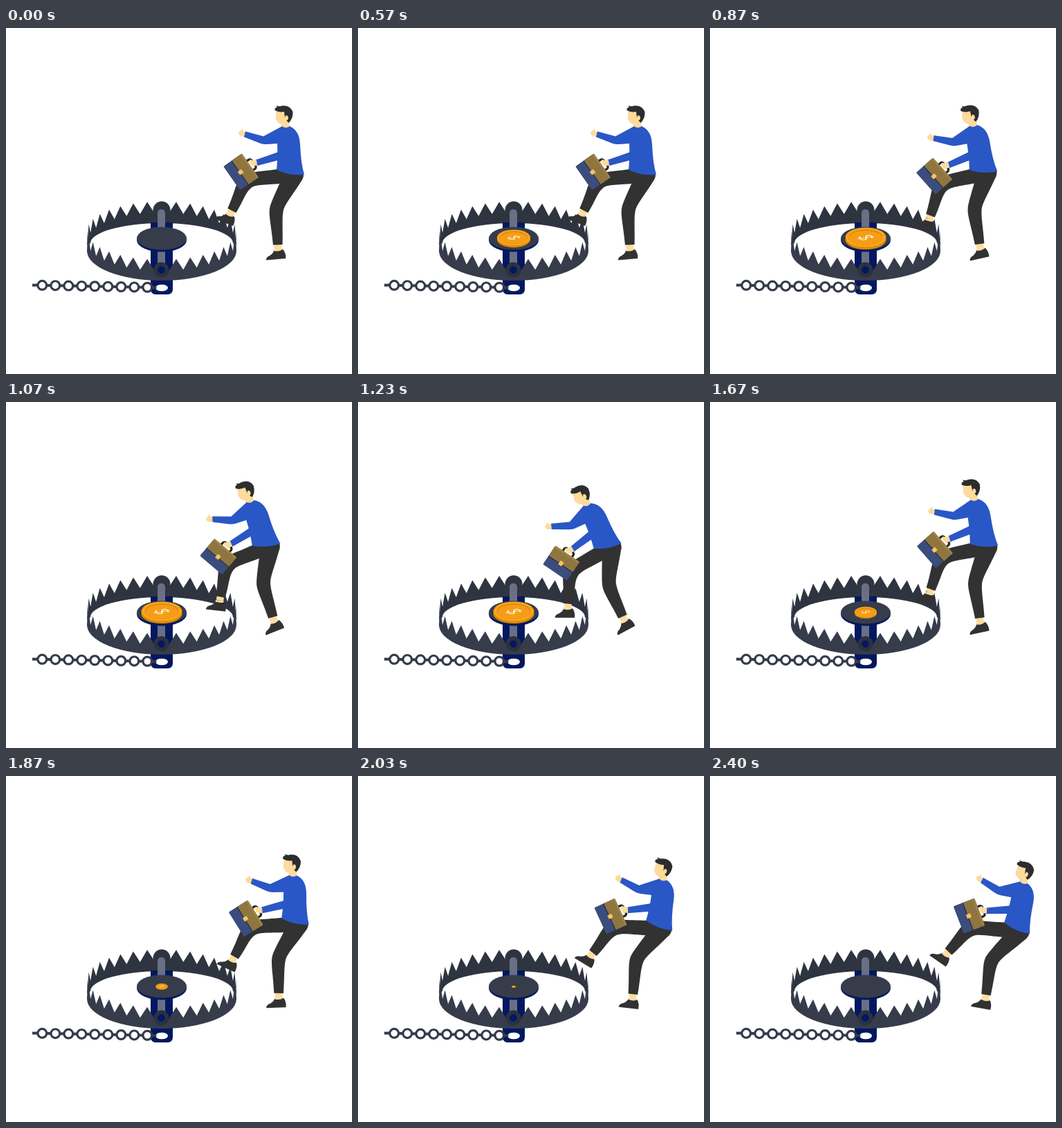
An HTML page with a canvas that plays this animation: 500x500 px, repeating every 2430 ms.

```html
<!DOCTYPE html>
<html lang="en">
<head>
<meta charset="utf-8">
<title>Trap</title>
<style>
html, body { margin: 0; width: 100%; height: 100%; overflow: hidden; background: #fff; }
canvas { display: block; width: 500px; height: 500px; }
</style>
</head>
<body>
<canvas id="stage"></canvas>
<script>
const canvas = document.getElementById('stage');
const ratio = Math.max(1, window.devicePixelRatio || 1);
canvas.width = canvas.height = 500 * ratio;
const ctx = canvas.getContext('2d');

const LOOP = 2430;
const C = {
  steel: '#2f3441', jaw: '#363c4a', navy: '#02185f', rod: '#697086', skin: '#fddb9d', shirt: '#2a57c6',
  pants: '#323232', hair: '#2d2d2d', gold: '#8f7640', blue: '#3b4d7d', clasp: '#f6c55c'
};
const TURN = 37.5 * Math.PI / 180;
const REST = 0.626;

// Joint places at three lean values, from crouching forward to leaning back
const LEANS = [0.068, REST, 1];
const JOINTS = {
  hip: [[360.5, 208.5], [411, 209], [443.5, 220.5]],
  frontKnee: [[308, 246], [348, 222], [376, 221]],
  frontAnkle: [[303, 297], [324, 268.5], [341, 257.5]],
  backKnee: [[363, 265], [391, 262], [407, 267]],
  backAnkle: [[384.5, 315], [393, 319], [398, 321.5]]
};

function joint(name, p) {
  const [a, b, c] = LEANS, k = JOINTS[name];
  const w = [
    (p - b) * (p - c) / ((a - b) * (a - c)),
    (p - a) * (p - c) / ((b - a) * (b - c)),
    (p - a) * (p - b) / ((c - a) * (c - b))
  ];
  return [0, 1].map(i => w[0] * k[0][i] + w[1] * k[1][i] + w[2] * k[2][i]);
}

function fill(d, color) {
  ctx.fillStyle = color;
  ctx.fill(new Path2D(d));
}

function oval(x, y, rx, ry, color) {
  ctx.fillStyle = color;
  ctx.beginPath();
  ctx.ellipse(x, y, rx, ry, 0, 0, 2 * Math.PI);
  ctx.fill();
}

function box(x, y, w, h, r, color) {
  ctx.fillStyle = color;
  ctx.beginPath();
  ctx.roundRect(x, y, w, h, r);
  ctx.fill();
}

function placed(x, y, angle, draw) {
  ctx.save();
  ctx.translate(x, y);
  ctx.rotate(angle);
  draw();
  ctx.restore();
}

// ---- trap ----
const TEETH = 16, STEP = Math.PI / TEETH;

function teeth(cy, ry) {
  const rim = a => [225 - 107.5 * Math.cos(a), cy + ry * Math.sin(a)];
  ctx.moveTo(...rim(0));
  for (let i = 0; i <= TEETH; i++) {
    const [x, y] = rim(i * STEP);
    ctx.lineTo(x, y - 16.5);
    ctx.lineTo(...rim(Math.min(Math.PI, (i + 0.5) * STEP)));
  }
}

function backJaw() {
  ctx.fillStyle = C.steel;
  ctx.beginPath();
  teeth(308, -41);
  ctx.lineTo(333, 314);
  ctx.lineTo(328, 311);
  ctx.ellipse(225, 311, 103, 29, 0, 0, Math.PI, true);
  ctx.lineTo(117, 314);
  ctx.fill();
}

function frontJaw() {
  ctx.fillStyle = C.jaw;
  ctx.beginPath();
  teeth(310.5, 40.5);
  ctx.lineTo(333, 322);
  ctx.ellipse(225, 322, 108, 43, 0, 0, Math.PI);
  ctx.fill();
}

function chain() {
  ctx.strokeStyle = '#353b4b';
  for (let i = 0; i < 9; i++) {
    const x = 52.3 + 19 * i, y = 371.8 + 0.37 * i;
    ctx.lineWidth = 3.2;
    ctx.beginPath();
    ctx.arc(x, y, 6.4, 0, 2 * Math.PI);
    ctx.stroke();
    ctx.lineWidth = 4;
    ctx.beginPath();
    ctx.moveTo(x + 6, y + 0.2);
    ctx.lineTo(x + 13, y + 0.3);
    ctx.stroke();
  }
  ctx.beginPath();
  ctx.moveTo(38, 371.6);
  ctx.lineTo(47, 371.6);
  ctx.stroke();
}

function trap(size) {
  backJaw();
  oval(225, 263, 12.5, 12.5, C.steel);
  box(209, 281, 32, 104, [0, 0, 7, 7], C.navy);
  oval(225, 375.5, 9, 4.8, '#fff');
  chain();
  box(219, 262, 11, 88, 5, C.rod);
  frontJaw();
  box(219, 324, 11, 20, 0, C.rod);
  oval(224.5, 349.5, 11, 11, '#2c3140');
  oval(224.5, 349.5, 5.2, 5.2, C.navy);
  oval(225, 306.5, 36, 17, C.navy);
  oval(225, 304, 36, 16.5, C.jaw);
  if (size > 0) coin(size);
}

function coin(size) {
  ctx.save();
  ctx.translate(225, 304.5);
  ctx.scale(size, size);
  oval(0, 1.5, 29.5, 14, '#e08a0b');
  oval(0, -2, 29.5, 14, '#f8a51b');
  oval(0, -2, 24.5, 11.2, '#d98209');
  oval(0, -1.3, 23.8, 10.4, '#f59d18');
  ctx.translate(0, -1.8);
  ctx.scale(1, 0.52);
  ctx.rotate(1.2);
  ctx.fillStyle = '#fff0cd';
  ctx.font = '27px Lato, sans-serif';
  ctx.textAlign = 'center';
  ctx.textBaseline = 'middle';
  ctx.fillText('$', 0, 1);
  ctx.restore();
}

// ---- man ----
function normal([x0, y0], [x1, y1]) {
  const d = Math.hypot(x1 - x0, y1 - y0);
  return [(y0 - y1) / d, (x1 - x0) / d];
}

const shift = ([x, y], [dx, dy], k) => [x + dx * k, y + dy * k];
const mix = ([x0, y0], [x1, y1], k) => [x0 + (x1 - x0) * k, y0 + (y1 - y0) * k];

// Trouser outline with a softly bent knee
function trouser(hip, knee, cuff, hipR, kneeR, cuffR) {
  const n0 = normal(hip, knee), n1 = normal(knee, cuff);
  const bend = normal([0, 0], [n0[1] + n1[1], -n0[0] - n1[0]]);
  const along = [bend[1], -bend[0]];
  const side = s => [shift(hip, n0, s * hipR), shift(knee, bend, s * kneeR), shift(cuff, n1, s * cuffR)];
  const [a, b, c] = side(1), [d, e, f] = side(-1);
  ctx.fillStyle = C.pants;
  ctx.beginPath();
  ctx.moveTo(...a);
  ctx.bezierCurveTo(...mix(a, b, 0.5), ...shift(b, along, -10), ...b);
  ctx.bezierCurveTo(...shift(b, along, 10), ...mix(b, c, 0.5), ...c);
  ctx.lineTo(...f);
  ctx.bezierCurveTo(...mix(f, e, 0.5), ...shift(e, along, 10), ...e);
  ctx.bezierCurveTo(...shift(e, along, -10), ...mix(e, d, 0.5), ...d);
  ctx.fill();
}

function leg(hip, knee, ankle, [hipR, kneeR], shoeTurn) {
  ctx.strokeStyle = C.skin;
  ctx.lineWidth = 10.5;
  ctx.beginPath();
  ctx.moveTo(...knee);
  ctx.lineTo(...ankle);
  ctx.stroke();
  placed(...ankle, shoeTurn, () => {
    fill('M-6 0H6V3H-6Z', C.skin);
    fill('M-6 2.5Q1 5 7 1.5Q11 7 10 15H-18.5Q-18.5 10.5 -12 8.5Q-8 6.5 -6 2.5Z', C.pants);
  });
  oval(...hip, hipR, hipR, C.pants);
  trouser(hip, knee, mix(knee, ankle, 0.9), hipR, kneeR, 6.8);
}

function briefcase() {
  ctx.strokeStyle = '#242424';
  ctx.lineWidth = 3.2;
  ctx.beginPath();
  ctx.roundRect(-8, -22, 16, 10, 3);
  ctx.stroke();
  box(-21, -16, 42, 32.5, 1.5, C.blue);
  box(-21, -16, 42, 17.5, 1.5, C.gold);
  box(-21, -16, 42, 2.5, 1, '#a38542');
  box(-21, 1.5, 42, 1.2, 0, '#2a3048');
  box(-3, -2.5, 6, 6.5, 1, C.clasp);
}

function upperBody() {
  // far arm with the case
  fill('M394 179L361 190.5L363 199L394 191Z', C.shirt);
  placed(339.7, 207.8, 55 * Math.PI / 180, briefcase);
  fill('M362 191L356 191Q351 189 352 193L354 198Q357 201 363 198Z', C.skin);
  // neck and face
  fill('M397 132H409L410 144Q403 147 398 143Z', C.skin);
  fill('M390.5 120L389.5 131Q392 138 398 139Q406 138 408 130V118Z', C.skin);
  fill('M388.5 119Q388 114.5 392 114.5L390.5 112Q395 114 398 112.5Q410 110.5 414.5 121Q415 131 408.5 137L405.5 134Q409 127 405 126L403 130L402 121Q395 122.5 388.5 119Z', C.hair);
  oval(405.5, 130, 2.4, 3.4, C.skin);
  // near hand, torso and arm
  fill('M347 149.5L343 149.5L342 145.5L340 147.5L336 150.5Q336 155.5 341 156.5L346 157.5Z', C.skin);
  fill('M399 142Q404 146 410 142Q424 148 425 168Q426 195 431 212Q410 214 391 205Q393 185 392 167L377 168Q372 168.5 367 166.5L344 157.5L346 149.5L372 156.5Z', C.shirt);
}

function man(p) {
  const hip = joint('hip', p), turn = TURN * (p - REST);
  const cos = Math.cos(turn), sin = Math.sin(turn);
  const anchor = (x, y) => [hip[0] + x * cos - y * sin, hip[1] + x * sin + y * cos];
  leg(anchor(5, 3), joint('backKnee', p), joint('backAnkle', p), [14, 10], 0.73 * (p - 0.75));
  leg(anchor(-6, 4), joint('frontKnee', p), joint('frontAnkle', p), [11, 11], TURN * (p - 0.068));
  placed(...hip, turn, () => {
    ctx.translate(-411, -209);
    upperBody();
  });
}

// ---- timing ----
function track(keys, t) {
  for (let i = 1; i < keys.length; i++) {
    const [t0, v0] = keys[i - 1], [t1, v1] = keys[i];
    if (t <= t1) return v0 + (v1 - v0) * (t - t0) / (t1 - t0);
  }
  return keys[keys.length - 1][1];
}

const LEAN = [[0, REST], [700, REST], [1300, 0], [2110, 1]];
const COIN = [[0, 0], [700, 1], [1300, 1], [2110, 0]];

function render(t) {
  ctx.setTransform(ratio, 0, 0, ratio, 0, 0);
  ctx.fillStyle = '#fff';
  ctx.fillRect(0, 0, 500, 500);
  trap(track(COIN, t));
  man(track(LEAN, t));
}

const start = performance.now();
function tick() {
  render((performance.now() - start) % LOOP);
  requestAnimationFrame(tick);
}
tick();
</script>
</body>
</html>
```
